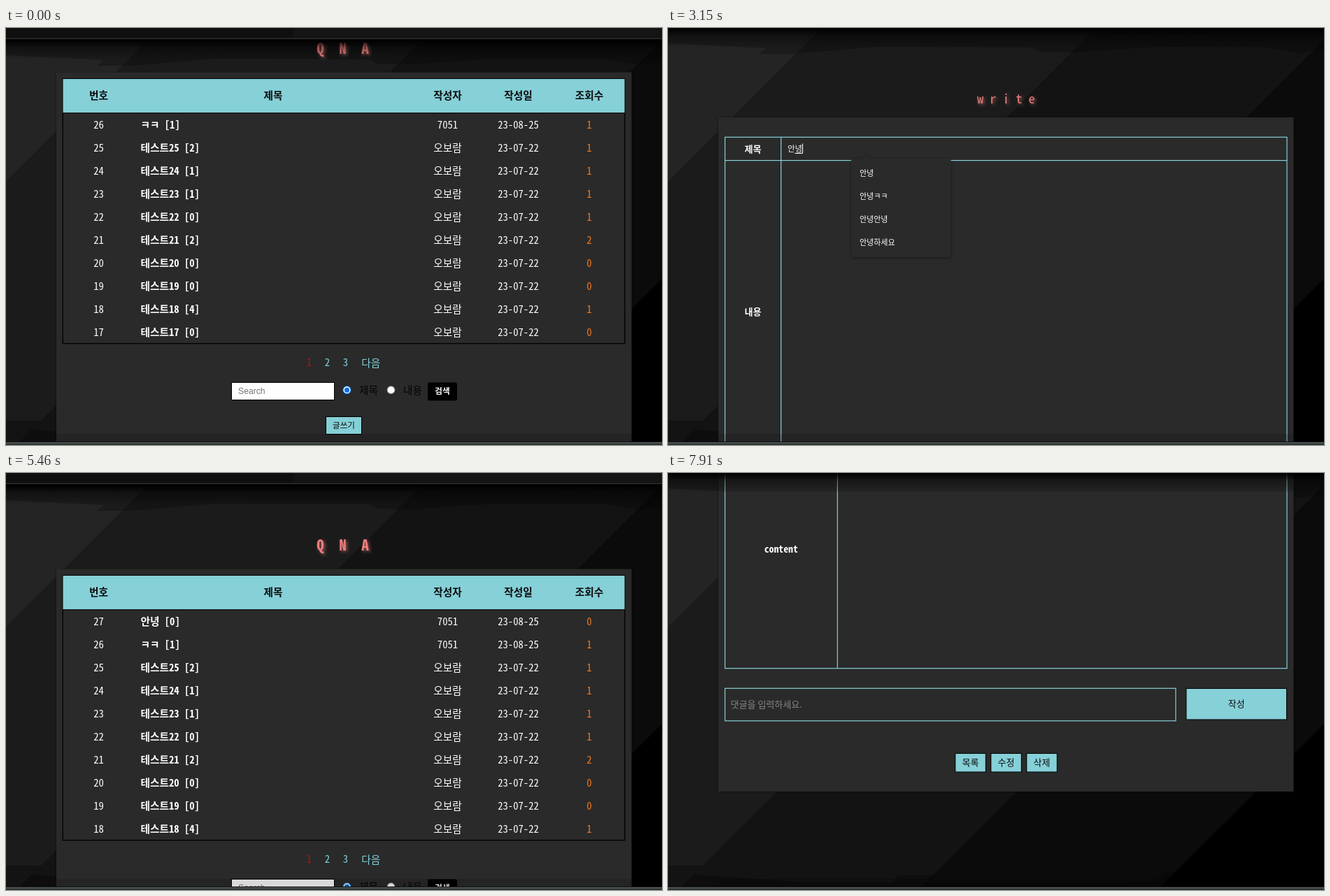
Write an HTML page with a canvas that moves like this. It is 938 by 597 pixels and loops after 8 s.

```html
<!DOCTYPE html>
<html lang="ko">
<head>
<meta charset="utf-8">
<title>QNA</title>
<style>
html, body { margin: 0; height: 100%; overflow: hidden; background: #000; }
canvas { display: block; }
</style>
</head>
<body>
<canvas id="stage" width="938" height="597"></canvas>
<script>
const g = document.getElementById('stage').getContext('2d');
const W = 938, H = 597, LOOP = 8000;
const MONO = '"Noto Sans Mono CJK KR", "Noto Sans Mono CJK JP", "Noto Sans CJK KR", "Noto Sans Mono", monospace';
const SANS = '"Noto Sans CJK KR", "Noto Sans CJK JP", "Noto Sans CJK", sans-serif';
const ARIAL = '"Liberation Sans", sans-serif';
const TEAL = '#86d0d8', PANEL = '#2a2a2a', WHITE = '#fff', INK = '#0c0c0c';

// ---- helpers ----
function box(x, y, w, h, color) {
  g.fillStyle = color;
  g.fillRect(x, y, w, h);
}

function poly(color, ...p) {
  g.fillStyle = color;
  g.beginPath();
  for (let i = 0; i < p.length; i += 2) g.lineTo(p[i], p[i + 1]);
  g.fill();
}

function frame(x, y, w, h, color) {
  g.strokeStyle = color;
  g.lineWidth = 1.2;
  g.strokeRect(x, y, w, h);
}

// cy is the optical middle of the line
function text(str, x, cy, size, { color = WHITE, bold = false, align = 'center', font = MONO } = {}) {
  g.font = `${bold ? 'bold ' : ''}${size}px ${font}`;
  g.textAlign = align;
  g.fillStyle = color;
  g.fillText(str, x, cy + size * 0.365);
}

function button(label, x, y, w, h, size = 13) {
  box(x, y, w, h, '#000');
  box(x + 1, y + 1, w - 2, h - 2, TEAL);
  text(label, x + w / 2, y + h / 2 - 0.5, size, { color: INK, font: SANS });
}

function heading(str, x, step, cy, size, bold) {
  g.save();
  g.shadowColor = 'rgba(240,128,128,.6)';
  g.shadowOffsetX = g.shadowOffsetY = 2;
  g.shadowBlur = 4;
  [...str].forEach((c, i) => text(c, x + i * step, cy, size, { color: '#f08080', bold }));
  g.restore();
}

function panel(top, bottom) {
  g.save();
  g.shadowColor = 'rgba(0,0,0,.5)';
  g.shadowBlur = 3;
  box(72, top, 822.5, bottom - top, PANEL);
  g.restore();
}

// Last entry whose start time has passed
const at = (steps, t) => steps.filter(s => s[0] <= t).pop();

// ---- fixed backdrop and edge shading ----
function backdrop(shift) {
  box(0, 0, W, H, '#000');
  [[1297, '#0b0b0b'], [955, '#131313'], [612, '#1b1b1b'], [220, '#242424']]
    .forEach(([s, c]) => poly(c, 0, 0, s, 0, 0, s));
  g.save();
  g.translate(0, shift);
  poly('rgba(0,0,0,.25)', 0, 0, W, 0, W, 31, 922, 33, 900, 36, 860, 28, 700, 27, 577, 35,
    530, 34, 520, 28, 300, 27, 180, 37, 130, 37, 140, 29, 0, 22);
  g.restore();
  poly('rgba(0,0,0,.3)', 0, 562, 50, 562, 38, 575, 200, 586, 320, 586, 330, 576, 380, 576,
    370, 586, 660, 586, 700, 583, 712, 572, 728, 572, 704, H, 0, H);
}

function shading(shift, scrolled) {
  if (scrolled) box(72, 0, 822.5, 27, 'rgba(0,0,0,.13)');
  box(72, 581, 822.5, 16, 'rgba(0,0,0,.15)');
  const top = g.createLinearGradient(0, shift, 0, shift + 28);
  top.addColorStop(0, 'rgba(0,0,0,.95)');
  top.addColorStop(0.2, 'rgba(0,0,0,.7)');
  top.addColorStop(0.4, 'rgba(0,0,0,.35)');
  top.addColorStop(0.7, 'rgba(0,0,0,.18)');
  top.addColorStop(1, 'rgba(0,0,0,0)');
  box(0, shift, W, 28, top);
  if (shift) {
    box(0, 0, W, shift, '#0f0f0f');
    box(411, 0, W - 411, 14, '#141414');
    box(0, 14.5, W, 1.5, '#2e2e2e');
    box(0, 16, W, 1, '#000');
  }
  box(0, 592, W, 1, '#111');
  box(0, 593, W, 2, '#4b5452');
  box(0, 595, W, 2, '#2c3331');
}

// ---- pages ----
const COMMENTS = '01211020040', HITS = '01111120010';

function listPage(first) {
  const S = 14.67, cols = [132.5, 382, 631.5, 732.5, 834];
  heading('QNA', 449.5, 32, 103.5, 21, true);
  panel(137.5, 760);
  box(80.5, 146, 805, 380.5, '#050505');
  box(82, 148, 802, 377, PANEL);
  box(81.5, 147, 803, 48.3, TEAL);
  box(81.5, 195.3, 803, 1, '#050505');
  ['번호', '제목', '작성자', '작성일', '조회수'].forEach((s, i) =>
    text(s, cols[i], 171, S, { color: INK, bold: true }));
  for (let i = 0; i < 10; i++) {
    const n = first - i, k = 27 - n, y = 212.7 + 33 * i, recent = n > 25;
    const name = n === 27 ? '안녕' : n === 26 ? 'ㅋㅋ' : '테스트' + n;
    text(n, cols[0], y, S);
    text(`${name} [${COMMENTS[k]}]`, 192.5, y, S, { bold: true, align: 'left' });
    text(recent ? '7051' : '오보람', cols[2], y, S);
    text(recent ? '23-08-25' : '23-07-22', cols[3], y, S);
    text(HITS[k], cols[4], y, S, { color: '#f47a20' });
  }
  const cyan = '#7fd3dc';
  text('1', 433.5, 553, S, { color: '#b81212' });
  text('2', 459.5, 553, S, { color: cyan });
  text('3', 485.5, 553, S, { color: cyan });
  text('다음', 521.8, 553.5, S, { color: cyan });

  box(322, 581, 148, 26, '#000');
  box(323, 582, 146, 24, WHITE);
  text('Search', 332, 594, 12.2, { color: '#757575', align: 'left', font: ARIAL });
  radio(487.5, true);
  text('제목', 518.5, 593, S, { color: '#050505' });
  radio(550.5, false);
  text('내용', 581.5, 593, S, { color: '#050505' });
  g.fillStyle = '#000';
  g.beginPath();
  g.roundRect(603, 581.5, 42, 26, 3);
  g.fill();
  text('검색', 624, 594, 11.6, { bold: true, font: SANS });
  button('글쓰기', 457, 630, 52, 26, 11.6);
}

function radio(x, on) {
  const disc = (r, c) => {
    g.fillStyle = c;
    g.beginPath();
    g.arc(x, 592.3, r, 0, 7);
    g.fill();
  };
  disc(6, on ? '#0d6fe0' : '#767676');
  disc(5, WHITE);
  if (on) disc(3.6, '#0d6fe0');
}

const RECENT = ['ㅇㄹ', 'ㅇㅇ', 'ㅇㅇㅇㅇ', 'ㅋㅋ', '안녕'];
const HELLO = ['안녕', '안녕ㅋㅋ', '안녕안녕', '안녕하세요'];

// [start, title text, suggestions, caret shown]
const TYPING = [
  [0, '', [], false], [2170, '', RECENT, true], [2590, 'ㅇ', RECENT.slice(0, 3), true],
  [2730, '아', [], true], [2800, '안', ['안', ...HELLO], true], [2940, '안ㄴ', [], true],
  [3010, '안녀', [], true], [3080, '안녕', [], true], [3150, '안녕', HELLO, true],
  [3640, '안녕', HELLO, false], [3710, '안녕', HELLO, true], [3850, '안녕', [], false]
];
const BODY = [[0, ''], [4060, 'ㅋ'], [4200, 'ㅋㅋ']];

// Text being composed: last character underlined, caret behind it
function field(str, y, caret, composing) {
  const x = 171, adv = 10.5, end = x + str.length * adv;
  text(str, x, y, 11.4, { align: 'left', font: SANS });
  if (composing && str) box(end - adv, y + 6.3, adv, 1.2, WHITE);
  if (caret) box(end, y - 7, 1, 14, WHITE);
}

function popup(items) {
  if (!items.length) return;
  g.save();
  g.shadowColor = 'rgba(0,0,0,.45)';
  g.shadowBlur = 4;
  g.shadowOffsetY = 1;
  g.fillStyle = PANEL;
  g.beginPath();
  g.roundRect(262, 187, 142.5, 9 + 33 * items.length, 4);
  g.fill();
  g.restore();
  poly('#242424', 273, 188, 281, 180, 289, 188);
  poly(PANEL, 274, 189, 281, 182, 288, 189);
  box(262.5, 187, 141.5, 6, PANEL);
  items.forEach((s, i) => text(s, 274, 208 + 33 * i, 11, { align: 'left', font: SANS }));
}

function writePage(t) {
  heading('write', 446.5, 18.4, 101.3, 18.3);
  panel(128, 687);
  frame(81.5, 156.3, 803.5, 466, TEAL);
  box(161, 156, 1.2, 466, TEAL);
  box(81.5, 189, 803.5, 1.2, TEAL);
  text('제목', 121.5, 173, 13, { bold: true, font: SANS });
  text('내용', 121.5, 406, 13, { bold: true, font: SANS });
  button('작성', 461, 641, 44.5, 27);
  const [, title, items, caret] = at(TYPING, t);
  field(title, 172.5, caret, t < 3850);
  field(at(BODY, t)[1], 205.7, t >= 3850, true);
  popup(items);
}

function detailPage() {
  const S = 13.75;
  heading('qna', 465, 18.4, 101.3, 18.3);
  panel(128, 788);
  frame(81.5, 137.7, 803.5, 474, TEAL);
  box(241.7, 137.5, 1.2, 474, TEAL);
  const rows = [['no.', '27'], ['title', '안녕'], ['hits', '1'], ['date', '23-08-25 21:24:44'], ['content', 'ㅋㅋ']];
  rows.forEach(([label, value], i) => {
    const y = 154.3 + 33 * i;
    if (i) box(81.5, 137 + 33 * i, 803.5, 1.2, TEAL);
    text(label, 161.7, i === 4 ? 441 : y, S, { bold: true });
    text(value, 251.7, y, S, { align: 'left' });
  });
  frame(81.5, 640.3, 644.5, 46.5, TEAL);
  text('댓글을 입력하세요.', 89.5, 663, 13, { color: '#858585', align: 'left', font: SANS });
  button('작성', 740.5, 640, 144.5, 45.5);
  ['목록', '수정', '삭제'].forEach((s, i) => button(s, 410.3 + 51 * i, 733, 44.5, 27.5));
}

const SCROLL = [[0, 74], [1400, 0], [4410, 70], [4480, 180], [4550, 231], [5460, 0],
  [7700, 70], [7770, 200], [7840, 300], [7910, 332]];

function draw(now) {
  const t = now % LOOP;
  const list = t < 1400 || (t >= 5460 && t < 7140);
  const shift = list ? 17 : 0, scroll = at(SCROLL, t)[1];
  backdrop(shift);
  g.save();
  g.translate(0, -scroll);
  if (list) listPage(t < 1400 ? 26 : 27);
  else if (t < 5460) writePage(t);
  else detailPage();
  g.restore();
  shading(shift, !list && scroll > 101);
}

const start = performance.now();
function tick() {
  draw(performance.now() - start);
  requestAnimationFrame(tick);
}
tick();
</script>
</body>
</html>
```
